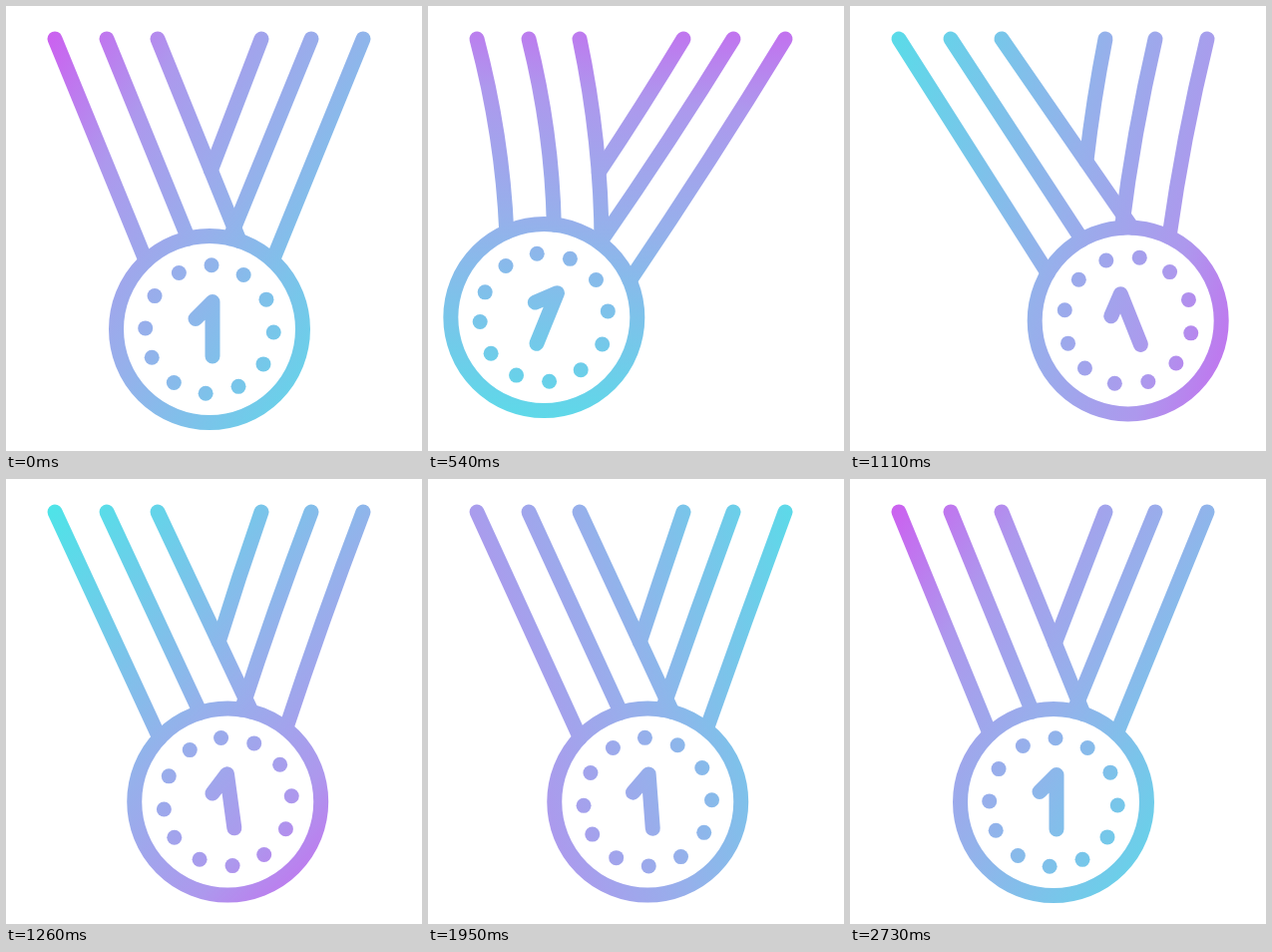
Animation, 417 px wide and 446 px high, one loop 3.09 s. Source, as an HTML page with a canvas:

```html
<!DOCTYPE html>
<html lang="en">
<head>
<meta charset="utf-8">
<title>Swinging medal</title>
<style>
  html, body { margin: 0; width: 100%; height: 100%; overflow: hidden; background: #fff; }
  canvas { display: block; }
</style>
</head>
<body>
<canvas id="stage" width="417" height="446"></canvas>
<script>
const ctx = document.getElementById('stage').getContext('2d');
const LOOP = 3090, STEP = 30, TURN_END = 2400;
const STROKE = 15, RING = 93.5, DOT_ORBIT = 64.3;
const PIVOT = { x: 204, y: -5 }, ARM = 329;
const LAG = 31, TILT = 1.48, TWIST = 1.25;
const rad = degrees => degrees * Math.PI / 180;
const ease = u => u * u * (3 - 2 * u);

// Horizontal offset of the medal: [time, px] at rest and at each turning point.
const swing = [[0, 0], [590, -89.5], [1005, 93], [1400, -12], [1880, 17], [2430, 0]];

// Ribbons: x of the top end, then the angle on the ring where it is attached.
const ribbons = [[49, -43], [101, -13.2], [152, 18.8], [306, 12.6], [358, 42.6]];
const TOP = 33;

function offsetAt(t) {
  if (t <= 0) return 0;
  const i = swing.findIndex(([time]) => time >= t);
  if (i < 0) return 0;
  const [t0, x0] = swing[i - 1], [t1, x1] = swing[i];
  return x0 + (x1 - x0) * ease((t - t0) / (t1 - t0));
}

// Pendulum angle in degrees, positive when the medal hangs to the left.
const angleAt = t => -Math.asin(offsetAt(t) / ARM) * 180 / Math.PI;

function gradientAt(t) {
  const u = Math.min(t / TURN_END, 1);
  const a = rad(-57 + 360 * (0.45 * u + 0.55 * ease(u)));
  const dx = Math.sin(a) * 255, dy = -Math.cos(a) * 255;
  const paint = ctx.createLinearGradient(208 + dx, 223 + dy, 208 - dx, 223 - dy);
  paint.addColorStop(0, '#ce5cf0');
  paint.addColorStop(0.25, '#ad98ed');
  paint.addColorStop(0.5, '#96b0eb');
  paint.addColorStop(1, '#4ee4e8');
  return paint;
}

// A ribbon that sags sideways; returns the point where a crossing ribbon meets it.
function ribbon(x0, x1, y1, sag) {
  const cx = (x0 + x1) / 2 + 2 * sag, cy = (TOP + y1) / 2;
  ctx.beginPath();
  ctx.moveTo(x0, TOP);
  ctx.quadraticCurveTo(cx, cy, x1, y1);
  ctx.stroke();
  const u = 0.65, v = 1 - u;
  return [v * v * x0 + 2 * u * v * cx + u * u * x1,
          v * v * TOP + 2 * u * v * cy + u * u * y1];
}

function medal(x, y, tilt) {
  ctx.beginPath();
  ctx.arc(x, y, RING, 0, 7);
  ctx.stroke();

  // Rotate points by hand so that the gradient stays in stage space.
  const c = Math.cos(tilt), s = Math.sin(tilt);
  const place = (px, py) => [x + px * c - py * s, y + px * s + py * c];

  for (let i = 0; i < 12; i++) {
    const a = rad(181 + 30.27 * i);
    ctx.beginPath();
    ctx.arc(...place(Math.cos(a) * DOT_ORBIT, Math.sin(a) * DOT_ORBIT), 7.5, 0, 7);
    ctx.fill();
  }

  ctx.beginPath();
  ctx.moveTo(...place(-14, -10.5));
  ctx.lineTo(...place(3, -27.5));
  ctx.lineTo(...place(3, 27));
  ctx.stroke();
}

function draw(t) {
  const angle = angleAt(t), tilt = TILT * angleAt(t - LAG);
  const x = PIVOT.x - ARM * Math.sin(rad(angle));
  const y = PIVOT.y + ARM * Math.cos(rad(angle));
  const slack = tilt - angle, twist = TWIST * angle;

  ctx.clearRect(0, 0, 417, 446);
  ctx.strokeStyle = ctx.fillStyle = gradientAt(t);
  ctx.lineWidth = STROKE;
  ctx.lineCap = ctx.lineJoin = 'round';

  // Left ribbons go slack only on the left swing, right ones stay tighter.
  const joints = ribbons.map(([top, at], i) => {
    const right = i > 2;
    const sag = right ? 0.3 * slack : 0.8 * Math.max(slack, 0);
    const a = rad(at + twist * (right && twist > 0 ? 1.25 : 1));
    return ribbon(top, x + RING * Math.sin(a), y - RING * Math.cos(a), sag);
  });
  ribbon(256, ...joints[2], 0.15 * slack);
  medal(x, y, rad(tilt));
}

const start = performance.now();
function tick() {
  const t = (performance.now() - start) % LOOP;
  draw(Math.floor(t / STEP) * STEP);
  requestAnimationFrame(tick);
}
tick();
</script>
</body>
</html>
```
